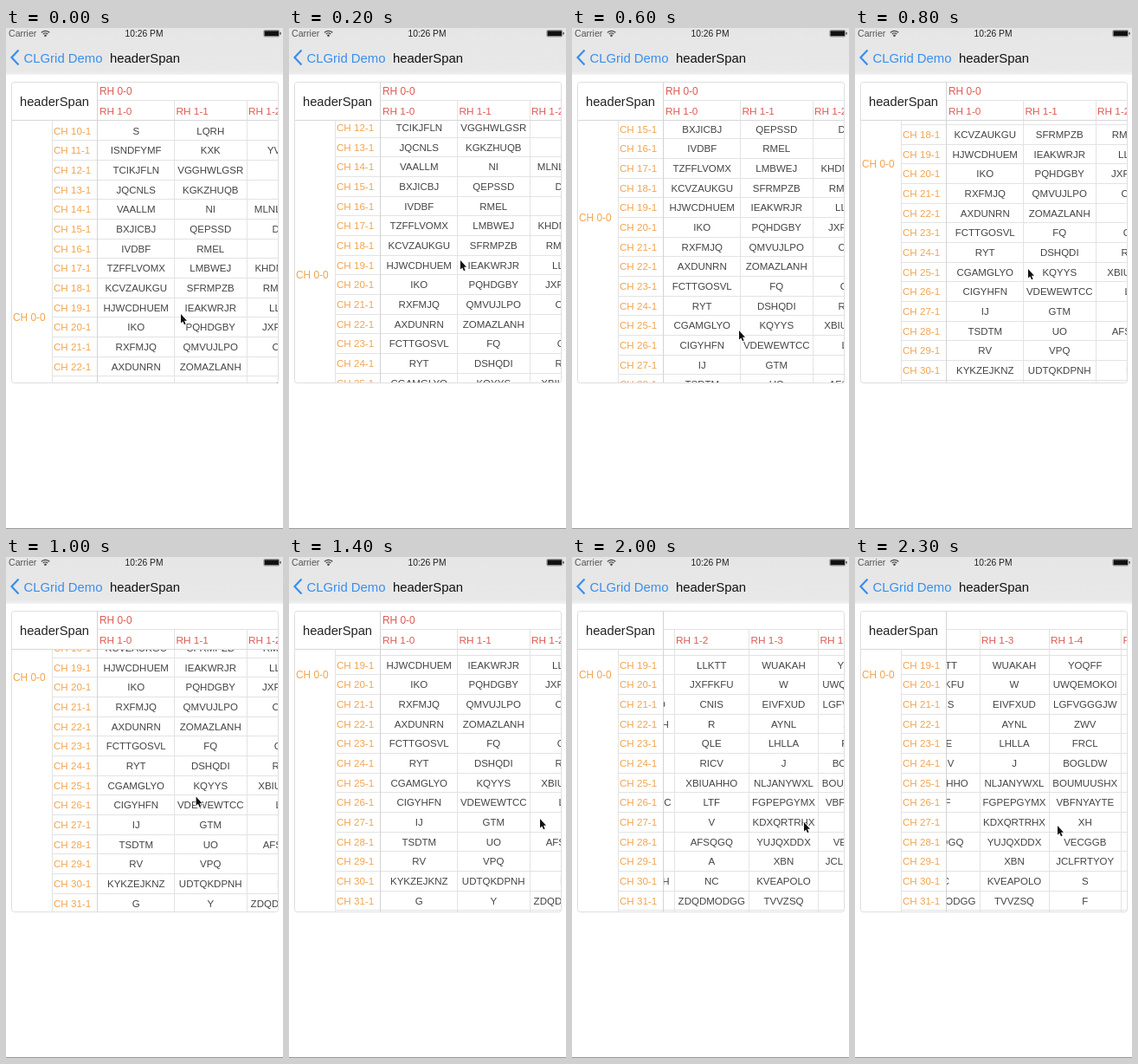
An HTML page with a canvas for the animation above (2400 ms loop, 320 by 578 pixels).

```html
<!DOCTYPE html>
<html lang="en">
<head>
<meta charset="utf-8">
<title>headerSpan</title>
<style>
html, body { margin: 0; width: 100%; height: 100%; overflow: hidden; background: #fff; }
canvas { display: block; }
</style>
</head>
<body>
<canvas id="stage" width="320" height="578"></canvas>
<script>
const ctx = document.getElementById('stage').getContext('2d');
const LOOP = 2400, STEP = 100;
const FONT = '"Liberation Sans", Arial, sans-serif';
const LEFT = 6.5, TOP = 62.5, RIGHT = 314.5, BOTTOM = 409.5;
const HEAD_X = 105.5, HEAD_Y = 106.5, SPAN_X = 53.5, SPAN_Y = 83.5;
const ROW_TOP = 107.2, ROW_H = 22.67, FIRST = 10;
const COLS = [106, 194.5, 278, 364.5, 444.5, 528, 612];
const LINE = '#e3e3e3', INK = '#444', ORANGE = '#f2a44e', RED = '#df5b55', BLUE = '#388fee';

const rows = `S LQRH I
ISNDFYMF KXK YVGKT
TCIKJFLN VGGHWLGSR EI
JQCNLS KGKZHUQB J
VAALLM NI MLNLVBHAS
BXJICBJ QEPSSD DRW
IVDBF RMEL T
TZFFLVOMX LMBWEJ KHDNWQBE
KCVZAUKGU SFRMPZB RMGXPA
HJWCDHUEM IEAKWRJR LLKTT WUAKAH YOQFF
IKO PQHDGBY JXFFKFU W UWQEMOKOI
RXFMJQ QMVUJLPO CNIS EIVFXUD LGFVGGGJW
AXDUNRN ZOMAZLANH R AYNL ZWV
FCTTGOSVL FQ QLE LHLLA FRCL
RYT DSHQDI RICV J BOGLDW
CGAMGLYO KQYYS XBIUAHHO NLJANYWXL BOUMUUSHX
CIGYHFN VDEWEWTCC LTF FGPEPGYMX VBFNYAYTE
IJ GTM V KDXQRTRHX XH
TSDTM UO AFSQGQ YUJQXDDX VECGGB
RV VPQ A XBN JCLFRTYOY
KYKZEJKNZ UDTQKDPNH NC KVEAPOLO S
G Y ZDQDMODGG TVVZSQ F`.split('\n').map(line => line.split(' '));

// Each key is [time, value, ...]; values between keys are linear.
const scrollY = [[0, 0], [100, 21], [200, 49], [300, 78], [400, 98], [600, 115.3],
  [700, 144], [800, 177], [900, 190], [1000, 195], [1200, 198]];
const scrollX = [[1400, 0], [1500, 20], [1700, 84.5], [1800, 113], [2000, 160], [2300, 220.5]];
const pointer = [[0, 202, 330], [200, 198, 268], [300, 196, 256], [600, 193, 349],
  [800, 200, 278], [900, 202, 270], [1400, 290, 302], [1700, 196, 296],
  [2000, 268, 306], [2300, 234, 310]];

function at(keys, t, k = 1) {
  const i = keys.findIndex(key => key[0] >= t);
  if (i < 0) return keys[keys.length - 1][k];
  if (i === 0) return keys[0][k];
  const a = keys[i - 1], b = keys[i];
  return a[k] + (b[k] - a[k]) * (t - a[0]) / (b[0] - a[0]);
}

function text(s, x, y, size, color, align = 'left') {
  ctx.font = `${size}px ${FONT}`;
  ctx.fillStyle = color;
  ctx.textAlign = align;
  ctx.fillText(s, x, y + size * 0.36);
}

function line(x1, y1, x2, y2, color = LINE) {
  ctx.strokeStyle = color;
  ctx.lineWidth = 1;
  ctx.beginPath();
  ctx.moveTo(x1, y1);
  ctx.lineTo(x2, y2);
  ctx.stroke();
}

function clipped(x1, y1, x2, y2, draw) {
  ctx.save();
  ctx.beginPath();
  ctx.rect(x1, y1, x2 - x1, y2 - y1);
  ctx.clip();
  draw();
  ctx.restore();
}

const snap = v => Math.floor(v) + 0.5;

function drawBars() {
  const shade = ctx.createLinearGradient(0, 0, 0, 55);
  shade.addColorStop(0, '#e6e6e6');
  shade.addColorStop(0.9, '#e8e8e8');
  shade.addColorStop(1, '#f4f4f4');
  ctx.fillStyle = shade;
  ctx.fillRect(0, 0, 320, 54);

  text('Carrier', 3, 6.5, 10.6, '#555');
  text('10:26 PM', 159.5, 6.5, 10.3, '#222', 'center');
  ctx.strokeStyle = ctx.fillStyle = '#444';
  ctx.lineWidth = 1.3;
  for (const r of [3.6, 6.2]) {
    ctx.beginPath();
    ctx.arc(45.5, 9.5, r, -Math.PI * 0.77, -Math.PI * 0.23);
    ctx.stroke();
  }
  ctx.beginPath();
  ctx.arc(45.5, 8.7, 1.3, 0, 7);
  ctx.fill();

  ctx.strokeStyle = '#777';
  ctx.lineWidth = 0.7;
  ctx.beginPath();
  ctx.roundRect(297.8, 2.5, 18, 7.5, 1.5);
  ctx.stroke();
  ctx.fillStyle = '#111';
  ctx.fillRect(298.5, 3.3, 16.5, 6);
  ctx.fillRect(316.5, 5, 1, 2.5);

  ctx.strokeStyle = BLUE;
  ctx.lineWidth = 2.2;
  ctx.beginPath();
  ctx.moveTo(14.5, 25.5);
  ctx.lineTo(6.5, 34);
  ctx.lineTo(14.5, 42.5);
  ctx.stroke();
  text('CLGrid Demo', 20.5, 34.3, 14.9, BLUE);
  text('headerSpan', 160.5, 34.3, 14.9, '#111', 'center');
  line(0, 577.5, 320, 577.5, '#999');
}

function drawGrid(sx, sy) {
  const colX = i => COLS[i] - sx;
  const rowY = i => ROW_TOP + i * ROW_H - sy;

  clipped(HEAD_X, HEAD_Y, RIGHT, BOTTOM, () => {
    rows.forEach((row, i) => row.forEach((word, c) =>
      text(word, (colX(c) + colX(c + 1)) / 2, rowY(i) + ROW_H / 2, 11.5, INK, 'center')));
  });

  clipped(LEFT, HEAD_Y, RIGHT, BOTTOM, () => {
    rows.forEach((row, i) => {
      text(`CH ${FIRST + i}-1`, 55, rowY(i) + ROW_H / 2, 11.6, ORANGE);
      const y = snap(rowY(i + 1));
      line(SPAN_X, y, RIGHT, y);
    });
    text('CH 0-0', 8, 334.2 - sy, 11.9, ORANGE);
  });

  clipped(HEAD_X, TOP, RIGHT, BOTTOM, () => {
    text('RH 0-0', 108 - sx, 73, 11.9, RED);
    for (let c = 0; c < 6; c++) {
      text(`RH 1-${c}`, colX(c) + 2, 96, 11.8, RED);
      if (c) line(snap(colX(c)), SPAN_Y, snap(colX(c)), BOTTOM);
    }
  });

  text('headerSpan', 56, 85, 14.7, '#222', 'center');
  line(HEAD_X, SPAN_Y, RIGHT, SPAN_Y);
  line(LEFT, HEAD_Y, RIGHT, HEAD_Y, '#d8d8d8');
  line(SPAN_X, HEAD_Y, SPAN_X, BOTTOM);
  line(HEAD_X, TOP, HEAD_X, BOTTOM, '#d3d3d3');
  ctx.strokeStyle = '#dedede';
  ctx.beginPath();
  ctx.roundRect(LEFT, TOP, RIGHT - LEFT, BOTTOM - TOP, 3);
  ctx.stroke();
}

function drawPointer(x, y) {
  const arrow = new Path2D('M0 0V10.5L2.3 8.4L4 12.3L5.6 11.6L4 7.8H7Z');
  ctx.save();
  ctx.translate(x, y);
  ctx.strokeStyle = '#fff';
  ctx.lineWidth = 1.6;
  ctx.stroke(arrow);
  ctx.fillStyle = '#111';
  ctx.fill(arrow);
  ctx.restore();
}

function frame() {
  const t = Math.floor(performance.now() % LOOP / STEP) * STEP;
  ctx.fillStyle = '#fff';
  ctx.fillRect(0, 0, 320, 578);
  drawBars();
  drawGrid(at(scrollX, t), at(scrollY, t));
  drawPointer(at(pointer, t), at(pointer, t, 2));
  requestAnimationFrame(frame);
}
frame();
</script>
</body>
</html>
```
